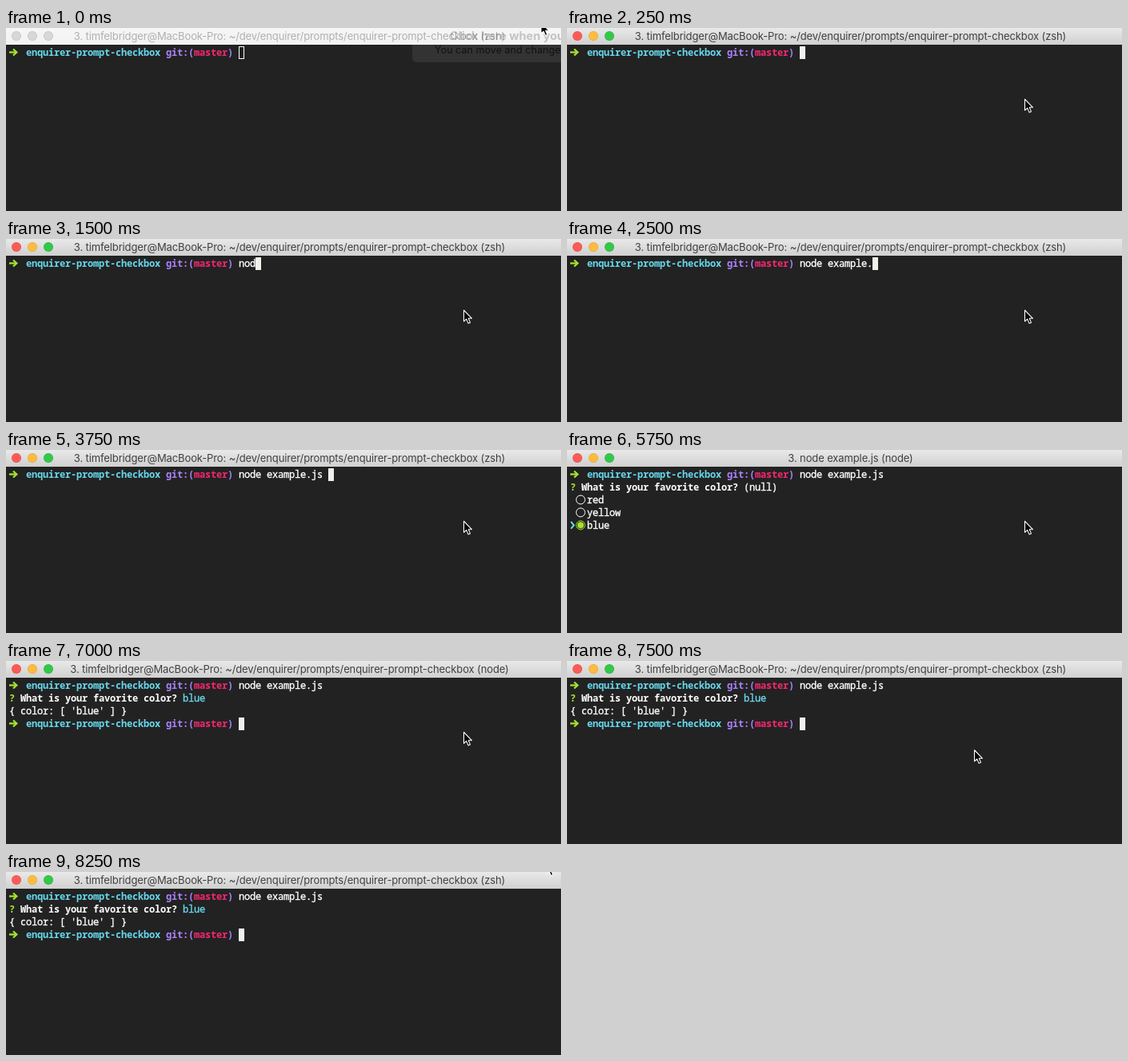
Write an HTML page with a canvas that moves like this. It is 694x230 px and loops after 8.5 s.

```html
<!DOCTYPE html>
<html lang="en">
<head>
<meta charset="utf-8">
<title>Checkbox prompt</title>
<style>
  html, body { margin: 0; width: 694px; height: 230px; overflow: hidden; background: #222; }
  canvas { display: block; }
</style>
</head>
<body>
<canvas id="stage" width="694" height="230"></canvas>
<script>
const ctx = document.getElementById('stage').getContext('2d');
const LOOP = 8500;
const CELL = 7, ROW = 16, LEFT = 4, TOP = 23;
const MONO = '"Noto Sans Mono", "DejaVu Sans Mono", monospace';
const SANS = 'Inter, Roboto, sans-serif';
const C = {
  bg: '#222222', white: '#ffffff', green: '#a6e22e',
  cyan: '#66d9ef', purple: '#ae81ff', pink: '#f92672'
};
const HOME = '3. timfelbridger@MacBook-Pro: ~/dev/enquirer/prompts/enquirer-prompt-checkbox';
const COMMAND = 'node example.js ';
const CHOICES = ['red', 'yellow', 'blue'];

// Each track lists [start time, value]; the last started value holds.
const TYPED = [[0, 0], [750, 1], [1250, 0], [1500, 3], [1750, 6], [2000, 7], [2500, 13], [3500, 14], [3750, 16]];
const TITLE = [[0, HOME + ' (zsh)'], [4250, '3. node example.js (zsh)'], [5000, '3. node example.js (node)'],
  [7000, HOME + ' (node)'], [7500, HOME + ' (zsh)']];
const ACTIVE = [[0, 0], [5500, 1], [5750, 2]];
const MOUSE = [[0, [669, -7]], [250, [572.5, 89.5]], [7250, [509.5, 112]], [8000, [611, 31]], [8250, [676, -12]]];

const at = (track, t) => track.filter(([start]) => start <= t).pop()[1];
const colX = col => LEFT + col * CELL;
const rowY = row => TOP + row * ROW;

function write(text, col, row, color, bold) {
  ctx.font = `${bold ? 700 : 400} 12px ${MONO}`;
  ctx.fillStyle = ctx.strokeStyle = color;
  ctx.lineWidth = 0.35;
  ctx.textAlign = 'left';
  [...text].forEach((ch, i) => {
    const x = colX(col + i), y = rowY(row) + 12;
    ctx.fillText(ch, x, y);
    // A hairline gives the regular face its screen weight.
    if (!bold) ctx.strokeText(ch, x, y);
  });
}

function line(points, color, width) {
  ctx.strokeStyle = color;
  ctx.lineWidth = width;
  ctx.beginPath();
  points.forEach(([x, y]) => ctx.lineTo(x, y));
  ctx.stroke();
}

function disc(x, y, r, color) {
  ctx.fillStyle = color;
  ctx.beginPath();
  ctx.arc(x, y, r, 0, Math.PI * 2);
  ctx.fill();
}

function ring(x, y, r, color) {
  ctx.strokeStyle = color;
  ctx.lineWidth = 1;
  ctx.beginPath();
  ctx.arc(x, y, r, 0, Math.PI * 2);
  ctx.stroke();
}

function titleBar(text, focused) {
  const fill = ctx.createLinearGradient(0, 0, 0, 21);
  fill.addColorStop(0, focused ? '#e9e9e9' : '#f6f6f6');
  fill.addColorStop(1, focused ? '#d0d0d0' : '#f2f2f2');
  ctx.fillStyle = fill;
  ctx.fillRect(0, 0, 694, 21);
  const lights = focused ? ['#fc5b57', '#fdbc40', '#34c84a'] : Array(3).fill('#d8d8d8');
  lights.forEach((color, i) => {
    const x = 13 + i * 20;
    disc(x, 10, 6, color);
    ring(x, 10, 5.6, 'rgba(0,0,0,0.08)');
  });
  ctx.font = `400 13px ${SANS}`;
  ctx.letterSpacing = '-0.12px';
  ctx.textAlign = 'center';
  ctx.fillStyle = focused ? '#404040' : '#b0b0b0';
  ctx.fillText(text, 354.5, 15);
  ctx.letterSpacing = '0px';
}

function shellPrompt(row) {
  const y = rowY(row) + 7.5;
  line([[4, y], [13, y]], C.green, 2.3);
  line([[9, y - 4], [13.3, y], [9, y + 4]], C.green, 2.3);
  write('enquirer-prompt-checkbox', 3, row, C.cyan, true);
  write('git:(', 28, row, C.purple, true);
  write('master', 33, row, C.pink, true);
  write(')', 39, row, C.purple, true);
}

function block(col, row, hollow) {
  if (hollow) {
    ctx.strokeStyle = C.white;
    ctx.lineWidth = 1;
    ctx.strokeRect(colX(col) + 0.5, rowY(row) + 0.5, CELL - 1, ROW - 1);
  } else {
    ctx.fillStyle = '#f0f0ec';
    ctx.fillRect(colX(col), rowY(row), CELL, ROW);
  }
}

function question() {
  write('?', 0, 1, C.green, true);
  write('What is your favorite color?', 2, 1, C.white, true);
}

function choices(active, picked) {
  CHOICES.forEach((name, i) => {
    const row = i + 2, y = rowY(row) + 7.5;
    const checked = picked && i === active;
    if (i === active) line([[5, y - 4.3], [8.6, y], [5, y + 4.3]], C.cyan, 2);
    ring(17, y, 5.5, checked ? C.green : C.white);
    if (checked) disc(17, y, 4, C.green);
    write(name, 3, row, C.white);
  });
}

function overlay() {
  ctx.fillStyle = '#333333';
  ctx.beginPath();
  ctx.roundRect(508, 21, 200, 22, [0, 0, 0, 5]);
  ctx.fill();
  ctx.textAlign = 'left';
  ctx.fillStyle = 'rgba(0,0,0,0.2)';
  ctx.font = `700 14.5px ${SANS}`;
  ctx.fillText('Click here when you', 555, 15);
  ctx.fillStyle = '#121212';
  ctx.font = `400 12.6px ${SANS}`;
  ctx.fillText('You can move and change', 536, 32);
}

function pointer([x, y]) {
  ctx.save();
  ctx.translate(x, y);
  ctx.beginPath();
  [[0, 0], [0, 14], [3.2, 11.1], [5.6, 16.6], [8, 15.6], [5.7, 10.3], [10, 10.3]]
    .forEach(([px, py]) => ctx.lineTo(px, py));
  ctx.closePath();
  ctx.lineJoin = 'round';
  ctx.lineWidth = 1.1;
  ctx.fillStyle = '#000';
  ctx.strokeStyle = '#fff';
  ctx.fill();
  ctx.stroke();
  ctx.restore();
}

function draw(t) {
  const focused = t >= 250;
  const typed = at(TYPED, t);
  ctx.fillStyle = C.bg;
  ctx.fillRect(0, 0, 694, 230);
  titleBar(at(TITLE, t), focused);
  shellPrompt(0);
  write(COMMAND.slice(0, typed), 41, 0, C.white);

  if (t < 4250) {
    block(41 + typed, 0, !focused);
  } else if (t < 6750) {
    const picked = t >= 5750;
    question();
    write('(null)' + (picked ? '' : ' (Press <space> to select)'), 31, 1, C.white);
    choices(at(ACTIVE, t), picked);
  } else {
    question();
    write('blue', 31, 1, C.cyan);
    write("{ color: [ 'blue' ] }", 0, 2, C.white);
    if (t >= 7000) {
      shellPrompt(3);
      block(41, 3);
    }
  }

  if (!focused) overlay();
  pointer(at(MOUSE, t));
}

const begin = performance.now();
function tick() {
  draw((performance.now() - begin) % LOOP);
  requestAnimationFrame(tick);
}
tick();
</script>
</body>
</html>
```
